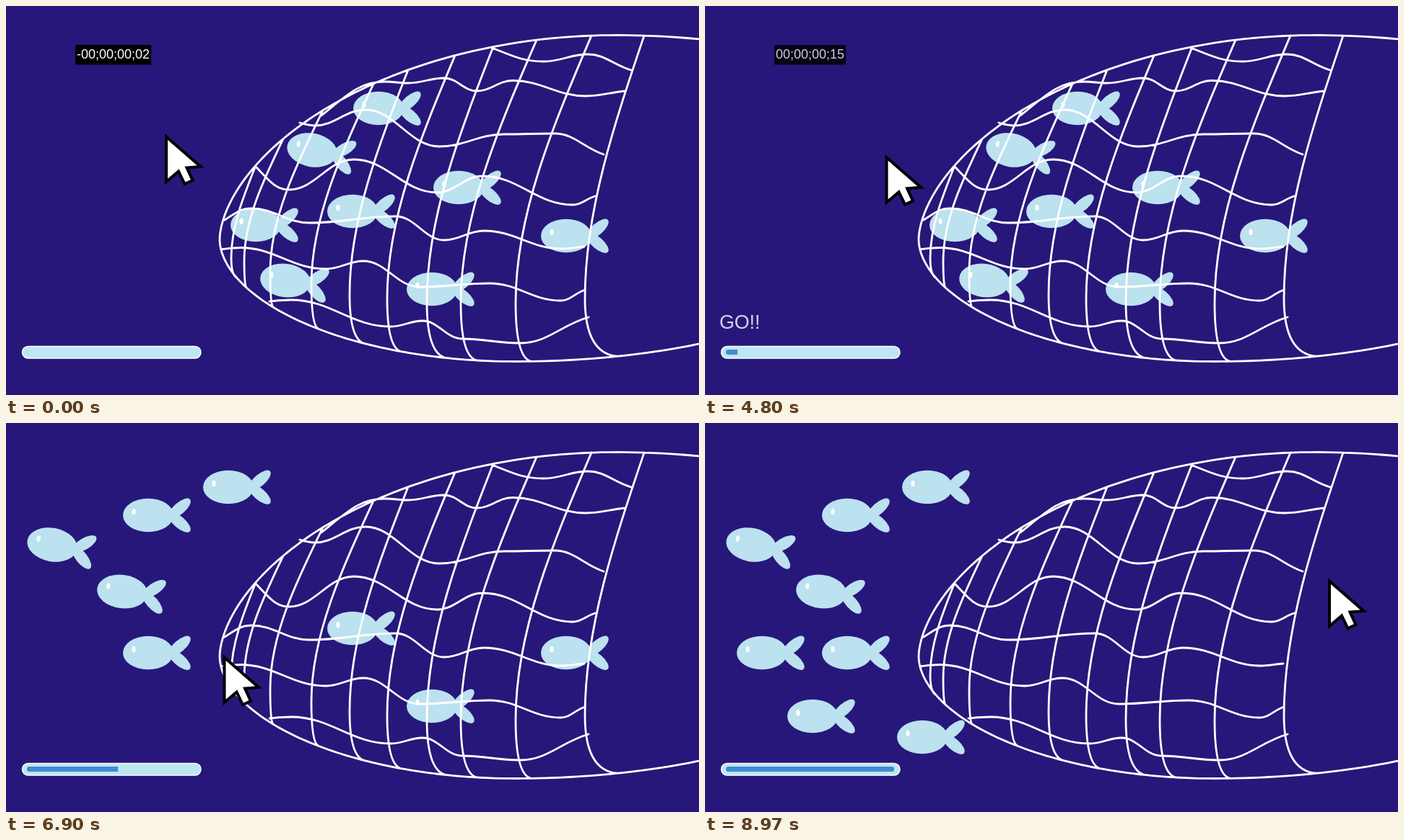
Animation of 960 by 540 pixels, one loop 9030 ms. Source, as an HTML page with a canvas:

```html
<!DOCTYPE html>
<html lang="pt">
<head>
<meta charset="utf-8">
<style>
html, body { margin: 0; width: 100%; height: 100%; overflow: hidden; background: #27177b; }
canvas { display: block; width: 960px; height: 540px; }
</style>
</head>
<body>
<canvas id="stage" width="960" height="540"></canvas>
<script>
const c = document.getElementById('stage').getContext('2d');
const STEP = 30, LOOP = 9030;
const FONT = 'px "Liberation Sans", Arial, sans-serif';
const MESSAGE = 'Agora tire os peixes da rede';
const clamp = v => Math.max(0, Math.min(1, v));
const mix = (a, b, k) => a + (b - a) * k;

// The rim is two flattened arcs that meet at the nose of the net
const NOSE = { x: 296, y: 324 };
const arc = (x, peak, reach, height, power) =>
  NOSE.y + height * Math.max(0, 1 - ((x - peak) / reach) ** 2) ** power;
const rimTop = x => arc(x, 845, x < 845 ? 549 : 631, -283.5, 0.58);
const rimBottom = x => arc(x, 705, x < 705 ? 409 : 505, 169.5, 0.53);

const net = new Path2D();
for (const rim of [rimTop, rimBottom]) {
  net.moveTo(NOSE.x, NOSE.y);
  for (let s = 0.5; s * s < 668; s += 0.25) net.lineTo(NOSE.x + s * s, rim(NOSE.x + s * s));
}

// Hangs from the rim, sags to its leftmost x, then curls to the lower rim
function rib(x, left, foot) {
  const y = rimTop(x), end = rimBottom(foot), low = mix(y, end, 0.82), third = (low - y) / 3;
  net.moveTo(x, y);
  net.bezierCurveTo(mix(x, left, 0.5), y + third, left, low - third, left, low);
  net.quadraticCurveTo(left, end - 4, foot, end);
}
rib(346, 312, 320);
rib(384, 330, 333);
rib(439, 366, 370);
rib(509, 423, 433);
rib(557, 476, 498);
rib(622, 528, 548);
rib(675, 583, 611);
rib(735, 630, 653);
rib(811, 706, 728);
rib(884, 802, 847);

// Wave through its crests and troughs, level at each of them
function wave(...p) {
  net.moveTo(p[0], p[1]);
  for (let i = 2; i < p.length; i += 2) {
    const [x, y, u, v] = p.slice(i - 2, i + 2);
    const first = i === 2, last = i === p.length - 2;
    net.bezierCurveTo(mix(x, u, 0.4), first ? mix(y, v, 0.6) : y,
      mix(x, u, 0.6), last ? mix(y, v, 0.7) : v, u, v);
  }
}
wave(673, 58, 745, 77, 806, 67, 866, 89);
wave(437, 152, 525, 105, 557, 107, 607, 100, 652, 118, 702, 103.5, 803, 125, 858, 118);
wave(407, 162, 428, 166, 498, 144, 600, 195, 690, 178, 760, 177, 828, 206);
wave(346, 223, 392, 255, 482, 213, 597, 259, 660, 236, 785, 276, 816, 264);
wave(303, 297, 340, 281, 420, 301, 540, 292, 607, 325, 662, 312, 770, 337, 801, 334);
wave(300, 337.5, 325, 335.5, 443, 365, 495, 354, 573, 390, 670, 385, 768, 409, 802, 394);
wave(365, 410, 395, 408, 533, 445, 577, 437, 632, 462, 712, 468, 807, 432);

const arrow = new Path2D('M0 3.5L47.5 45L28.5 46.5L36.5 64L25.5 69L17 51.5L0 66Z');
const hand = new Path2D('M-5 37V6Q-5 1 .5 1Q6 1 6 6V19Q7 15 11 15Q16 15 16.5 20Q18 17 22 17Q26 18 27 23Q29 21 32 22Q37 23 36.5 29L35 47L31 67H-1L-7 54L-22 34Q-24 28-18 28Q-13 29-5 38Z');
const knuckles = new Path2D('M6 16V30M16.5 20V31M27 23V33');

// Carried from (x, y) to (u, v) between two steps; hold is the cursor's offset
function fish(x, y, u, v, grab, drop, tilt = 0, hx = 9, hy = 3) {
  return {
    tilt, grab, drop,
    at: n => {
      const k = clamp((n - grab) / (drop - grab));
      return [mix(x, u, k), mix(y, v, k)];
    },
    stops: [[grab, x + hx, y + hy], [drop, u + hx, v + hy]]
  };
}
const school = [
  fish(346, 304, 197, 128, 167, 173),
  fish(387, 381, 161, 234, 179, 185, 0.13),
  fish(424, 200, 64, 169, 191, 199, 0.19),
  fish(516, 142, 308, 89, 205, 211),
  fish(627, 252, 197, 319, 218, 228),
  fish(776, 319, 79, 319, 240, 247),
  fish(480, 285, 149, 407, 254, 262, 0, -38, 20),
  fish(590, 393, 301, 436, 272, 285, 0, -46, -2)
];
const route = [[158, 222, 178], ...school.flatMap(f => f.stops), [297, 865, 216]];

function oval(x, y, rx, ry, turn = 0) {
  c.beginPath();
  c.ellipse(x, y, rx, ry, turn, 0, 7);
  c.fill();
}

function drawFish(f, n) {
  c.save();
  c.translate(...f.at(n));
  c.rotate(f.tilt);
  c.fillStyle = '#bce1ef';
  oval(43.5, -9.5, 19, 8, -0.72);
  oval(43.5, 10, 19, 8, 0.72);
  oval(0, 0, 35, 23.3);
  c.fillStyle = '#fff';
  oval(-20, -5, 2.6, 4.2);
  c.restore();
}

function drawCursor(n) {
  let i = 0;
  while (i < route.length - 2 && n >= route[i + 1][0]) i++;
  const [a, b] = [route[i], route[i + 1]];
  const k = clamp((n - a[0]) / (b[0] - a[0]));
  const dragging = i % 2 === 1;
  const shape = dragging ? hand : arrow;
  c.save();
  c.translate(mix(a[1], b[1], k), mix(a[2], b[2], k));
  c.fillStyle = '#fff';
  c.strokeStyle = '#000';
  c.lineJoin = dragging ? 'round' : 'miter';
  c.lineWidth = dragging ? 5 : 4;
  c.fill(shape);
  c.stroke(shape);
  if (dragging) c.stroke(knuckles);
  c.restore();
}

function write(text, x, y, size, alpha = 1) {
  c.globalAlpha = alpha;
  c.font = size + FONT;
  c.fillStyle = '#fff';
  c.fillText(text, x, y);
  c.globalAlpha = 1;
}

// Letters fade in one by one, later out in the same order
function drawMessage(n) {
  if (n >= 120) return;
  const len = MESSAGE.length;
  const shown = n / 53 * len, gone = (n - 90) / 29.3 * len;
  c.font = 26.75 + FONT;
  for (let i = 0; i < len; i++) {
    const x = 18 + c.measureText(MESSAGE.slice(0, i)).width;
    write(MESSAGE[i], x, 45, 26.75, clamp(shown - i) * (1 - clamp(gone - i)));
  }
}

function drawTimer(n, alpha) {
  const v = n < 145 ? n - 2 : n - 145, m = Math.abs(v);
  const two = x => String(x).padStart(2, '0');
  const text = (v < 0 ? '-' : '') + '00;00;' + two(Math.floor(m / 30)) + ';' + two(m % 30);
  c.globalAlpha = alpha;
  c.font = 18 + FONT;
  c.fillStyle = '#000';
  c.fillRect(96, 54, c.measureText(text).width + 4, 27.5);
  write(text, 98, 73.3, 18, alpha);
}

function pill(x, y, w, h, r, fill) {
  c.beginPath();
  c.roundRect(x, y, w, h, r);
  c.fillStyle = fill;
  c.fill();
}

function drawBar(n) {
  pill(22.5, 472.5, 247.5, 16.5, 8.2, '#bde6f2');
  c.strokeStyle = '#fff';
  c.lineWidth = 1.5;
  c.stroke();
  c.save();
  c.beginPath();
  c.rect(28, 470, 1.3 + 233 * clamp((n - 150) / 148), 20);
  c.clip();
  pill(29, 477, 233, 7, 3, '#3e8cd2');
  c.restore();
}

function draw(n) {
  c.fillStyle = '#27177b';
  c.fillRect(0, 0, 960, 540);
  school.forEach(f => drawFish(f, n));
  c.strokeStyle = '#fff';
  c.lineWidth = 2.8;
  c.lineCap = 'round';
  c.stroke(net);
  drawMessage(n);
  const fade = 1 - clamp((n - 155) / 26);
  if (fade > 0) {
    drawTimer(n, fade);
    write('GO!!', 20, 448, 26.75, fade * clamp((n - 120) / 10));
  }
  drawBar(n);
  drawCursor(n);
}

const start = performance.now();
function tick() {
  const t = (performance.now() - start) % LOOP;
  draw(Math.min(299, Math.floor(t / STEP)));
  requestAnimationFrame(tick);
}
tick();
</script>
</body>
</html>
```
